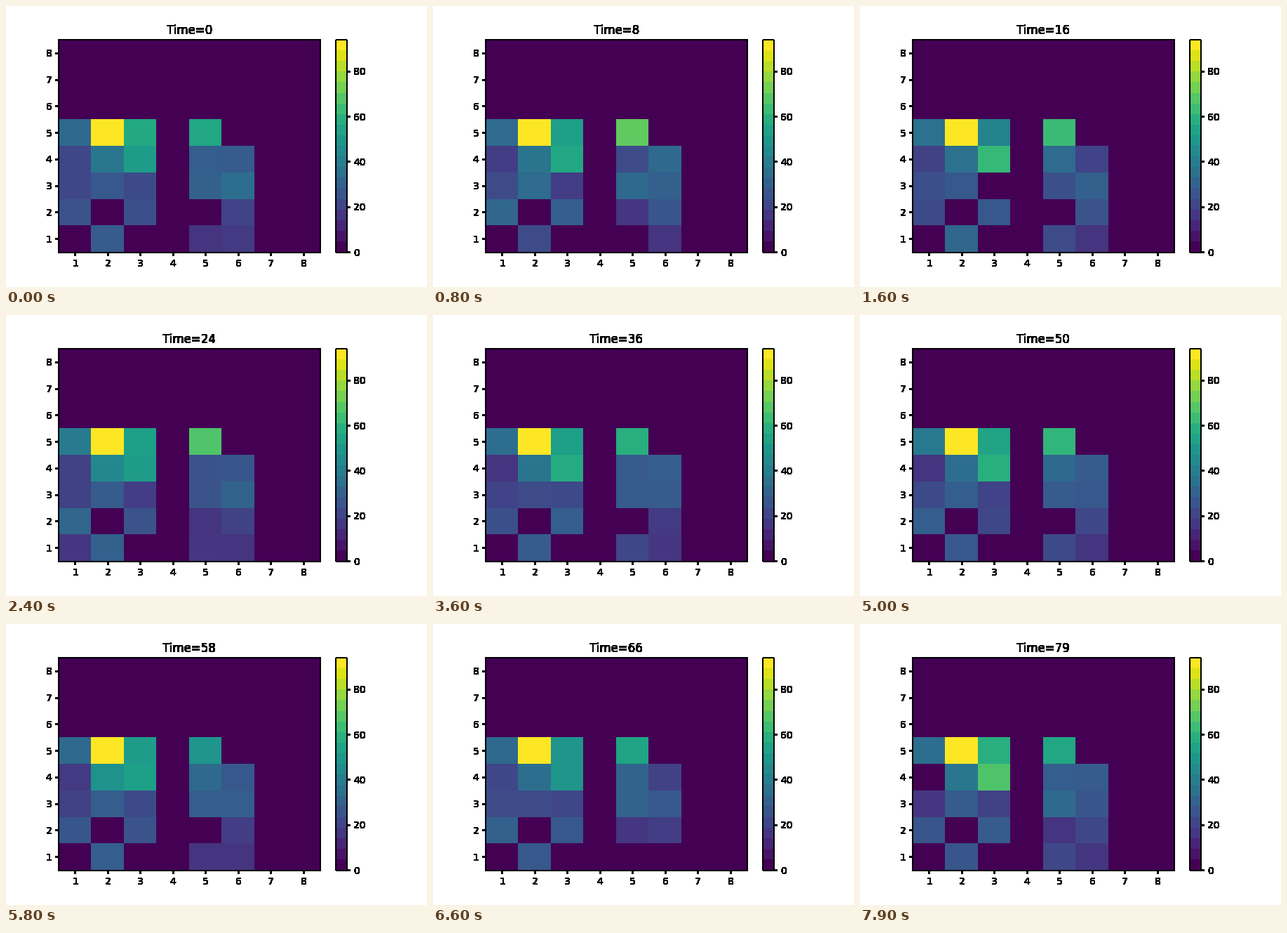
Animation, 600 px wide and 400 px high, one loop 8000 ms. Source, as a matplotlib script:

```python
import numpy as np
import matplotlib.pyplot as plt
from matplotlib.animation import FuncAnimation
from matplotlib.cm import ScalarMappable
from matplotlib.colors import Normalize

FRAMES, INTERVAL = 80, 100
WIDTH, HEIGHT = 600, 400
SIZE, VMAX = 8, 94
FLOOR = 14      # weaker readings show as zero
PEAK = (4, 1)   # row and column of the steady maximum

# Typical level of the active cells, bottom row first.
LEVELS = np.zeros((SIZE, SIZE))
LEVELS[:5, :6] = [
    [11, 28, 0, 0, 16, 15],
    [27, 0, 25, 0, 12, 20],
    [22, 27, 20, 0, 30, 28],
    [17, 37, 57, 0, 30, 26],
    [33, VMAX, 56, 0, 60, 0],
]
SPREAD = 2 + 0.08 * LEVELS


def grid_at(t):
    noise = np.random.default_rng(t).normal(size=LEVELS.shape)
    grid = np.round(LEVELS + SPREAD * noise)
    grid[grid < FLOOR] = 0
    grid[PEAK] = VMAX
    return grid


def harden(img, dpi):
    """Make every touched pixel opaque, for hard unsmoothed edges."""
    img[..., 3] = img[..., 3] > 0
    return img, 0, 0


def add_axes(x, y, w, h):
    axes = fig.add_axes([x / WIDTH, y / HEIGHT, w / WIDTH, h / HEIGHT])
    axes.set_agg_filter(harden)
    return axes


plt.rcParams.update({"font.family": "DejaVu Sans", "font.size": 10})
fig = plt.figure(figsize=(WIDTH / 100, HEIGHT / 100), dpi=100)
ax = add_axes(75.2, 50, 372, 302)
cax = add_axes(470.25, 50, 15.1, 302)

norm = Normalize(0, VMAX)
edge = SIZE + 0.5
image = ax.imshow(grid_at(0), cmap="viridis", norm=norm, origin="lower",
                  aspect="auto", interpolation="nearest",
                  extent=(0.5, edge, 0.5, edge))
ax.set_xticks(range(1, SIZE + 1))
ax.set_yticks(range(1, SIZE + 1))
title = ax.set_title("Time=0", fontsize=12)

bands = ScalarMappable(norm, plt.get_cmap("viridis", 20))
fig.colorbar(bands, cax=cax, ticks=range(0, 81, 20))


def update(t):
    image.set_data(grid_at(t))
    title.set_text(f"Time={t}")
    return image, title


anim = FuncAnimation(fig, update, frames=FRAMES, interval=INTERVAL,
                     repeat=True, repeat_delay=0, blit=False)
plt.show()
```
